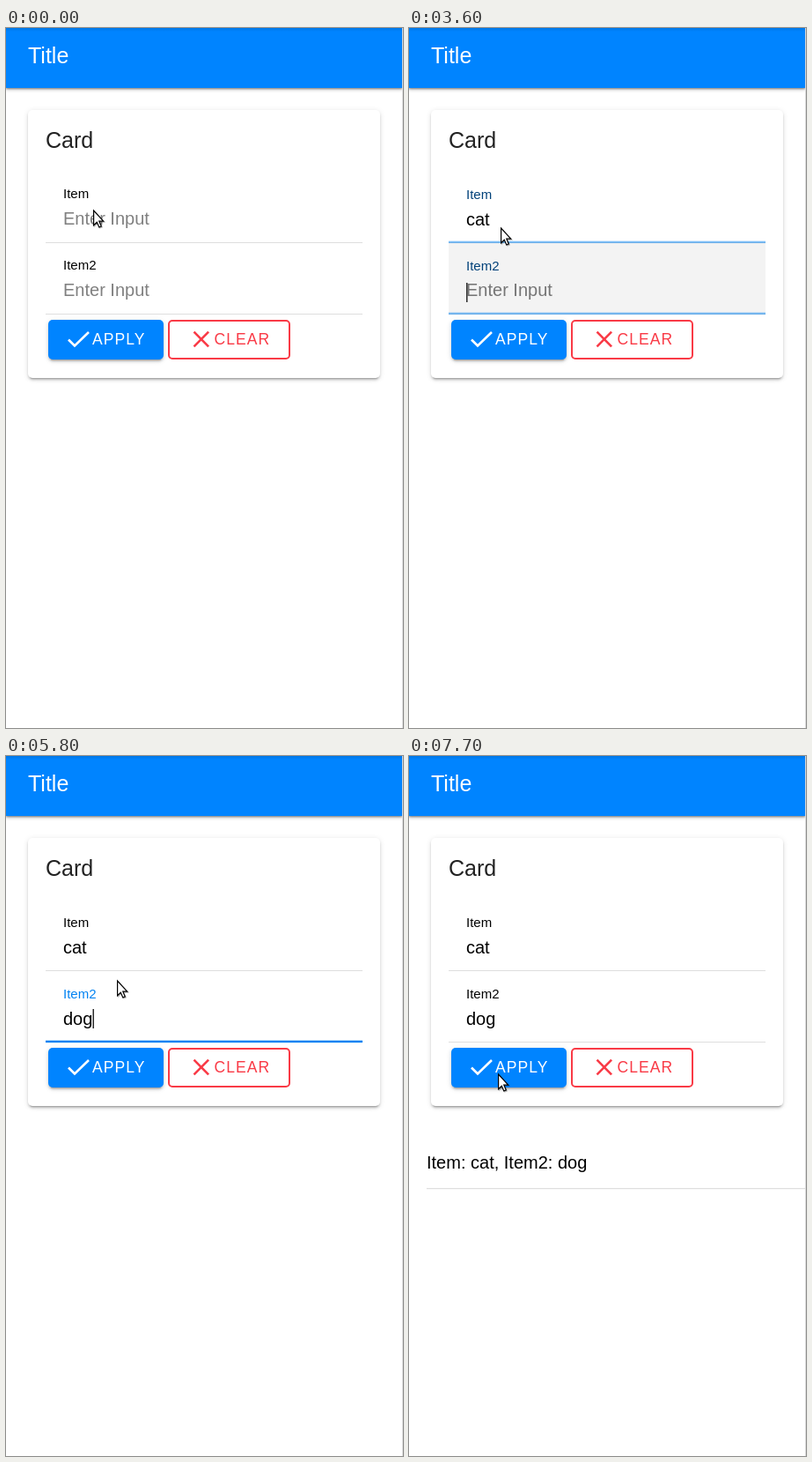
These frames come from a looping animation (451x794 px, 8 s). An HTML page:

```html
<!DOCTYPE html>
<html lang="en">
<head>
<meta charset="utf-8">
<title>Form demo</title>
<style>
html, body { margin: 0; width: 100%; height: 100%; overflow: hidden; background: #fff; }
div, svg { position: absolute; box-sizing: border-box; }
#header {
  left: 0; top: 0; width: 450px; height: 68px;
  background: linear-gradient(#0076e4, #0084ff 4px);
  box-shadow: 0 1px 2px rgba(0,0,0,.4), 0 2px 4px rgba(0,0,0,.22);
}
#edge { left: 450px; top: 0; width: 1px; height: 100%; background: #d8d8d8; }
#card { left: 25px; top: 93px; width: 400px; height: 303.5px; border-radius: 5px; background: #fff; }
#apply { left: 47.5px; top: 330.5px; width: 131.3px; height: 45px; border-radius: 5px; background: #0084ff; overflow: hidden; }
#lift { left: 47.5px; top: 330.5px; width: 131.3px; height: 45px; border-radius: 5px;
  box-shadow: 0 6px 6px -4px rgba(0,0,0,.2), 0 10px 12px 1px rgba(0,0,0,.14), 0 4px 17px 2px rgba(0,0,0,.12); }
#card, #apply { box-shadow: 0 3.75px 1.25px -2.5px rgba(0,0,0,.2), 0 2.5px 2.5px rgba(0,0,0,.14), 0 1.25px 6.25px rgba(0,0,0,.12); }
#ripple { border-radius: 50%; background: #fff; transform: translate(-50%, -50%); left: 53.5px; top: 29.5px; }
#clear { left: 184px; top: 330.5px; width: 138.6px; height: 45px; border-radius: 5px; border: 2.5px solid #f93a46; }
svg { left: 0; top: 0; }
text { font: 20px "Liberation Sans", Arial, sans-serif; white-space: pre; }
.big { font-size: 25px; }
.label { font-size: 15px; }
.button { font-size: 17.5px; letter-spacing: 1.05px; }
.icon { fill: none; stroke-width: 2.6; }
#cursor { filter: drop-shadow(1px 1px .6px rgba(0,0,0,.25)); }
</style>
</head>
<body>
<div id="header"></div>
<div id="card"></div>
<div id="lift"></div>
<div id="apply"><div id="ripple"></div></div>
<div id="clear"></div>
<div id="edge"></div>
<svg width="451" height="794">
  <text class="big" x="25" y="40" fill="#fff">Title</text>
  <text class="big" x="45" y="136" fill="#222">Card</text>
  <g id="items"></g>
  <path class="icon" d="M71 353.5l7 7L94 345" stroke="#fff"/>
  <text class="button" x="98" y="359" fill="#fff">APPLY</text>
  <path class="icon" d="M213.5 344.7l16.6 16.6m0-16.6l-16.6 16.6" stroke="#f93a46"/>
  <text class="button" x="236.6" y="359" fill="#f93a46">CLEAR</text>
  <g id="result">
    <text x="20" y="468">Item: cat, Item2: dog</text>
    <rect x="20" y="490" width="430" height="1.25" fill="#dedede"/>
  </g>
  <path id="cursor" d="M.6 1V17.8L4.3 14.2 6.8 20 9.3 18.9 6.8 13.2H11.7Z" fill="#fff" stroke="#000" stroke-width="1.2"/>
</svg>
<script>
const LOOP = 8000;
const $ = id => document.getElementById(id);

const items = [
  { name: 'Item', y: 0, value: 'cat', focus: 600, blur: 3600, keys: [1900, 2200, 2300] },
  { name: 'Item2', y: 81, value: 'dog', focus: 3600, blur: 7200, keys: [4300, 4400, 4500], tabbed: true }
];

// Time, x and y of the pointer tip.
const pointerPath = [
  [0, 99, 206], [300, 104, 226], [5400, 104, 226], [5500, 103, 226], [5600, 103, 226],
  [5800, 126, 254], [5900, 137, 284], [6000, 130, 317], [6100, 113, 344], [6200, 101, 360]
];

// Time, ripple diameter, ripple opacity and button lift.
const pressPath = [
  [7100, 0, 0, 0], [7200, 80, .16, .4], [7300, 153, .17, 1],
  [7400, 190, .16, .9], [7700, 190, 0, 0]
];

function sample(path, t) {
  const i = path.findIndex(p => p[0] > t);
  if (i === 0) return path[0].slice(1);
  if (i < 0) return path[path.length - 1].slice(1);
  const a = path[i - 1], b = path[i], k = (t - a[0]) / (b[0] - a[0]);
  return a.slice(1).map((v, n) => v + (b[n + 1] - v) * k);
}

function make(parent, tag, attrs) {
  const el = document.createElementNS('http://www.w3.org/2000/svg', tag);
  for (const key in attrs) el.setAttribute(key, attrs[key]);
  return parent.appendChild(el);
}

for (const item of items) {
  const g = make($('items'), 'g', { transform: `translate(0 ${item.y})` });
  item.shade = make(g, 'rect', { x: 45, y: 163, width: 360, height: 81, fill: '#e7e7e7' });
  make(g, 'rect', { x: 45, y: 243, width: 360, height: 1, fill: '#dedede' });
  item.line = make(g, 'rect', { x: 45, y: 241.7, width: 360, height: 2.4, fill: '#0082f2' });
  item.label = make(g, 'text', { class: 'label', x: 65 });
  item.label.textContent = item.name;
  item.text = make(g, 'text', { x: 65 });
  item.caret = make(g, 'rect', { width: 1.25, height: 22 });
}

function drawItem(item, t) {
  const focused = t >= item.focus && t < item.blur;
  const glow = sample([[item.focus - 100, 0], [item.focus + 100, 1],
    [item.blur - 100, 1], [item.blur + 100, 0]], t)[0];
  const typed = item.value.slice(0, item.keys.filter(k => t >= k).length);

  item.label.setAttribute('y', t >= item.focus ? 194 : 193);
  item.label.setAttribute('fill', `rgb(0,${130 * glow},${242 * glow})`);
  item.line.setAttribute('opacity', glow);

  const since = t - item.focus;
  item.shade.setAttribute('opacity', item.tabbed && since >= 0 && since < 200 ? (since < 100 ? .5 : 1) : 0);

  item.text.textContent = typed || 'Enter Input';
  item.text.setAttribute('y', typed ? 224 : 223);
  item.text.setAttribute('fill', typed ? '#000' : since >= 0 && since < 200 && item.tabbed ? '#757575' : '#808080');

  const lastInput = [item.focus, ...item.keys].filter(k => t >= k).pop();
  const lit = focused && Math.floor((t - lastInput) / 500) % 2 === 0;
  item.caret.setAttribute('opacity', lit ? 1 : 0);
  item.caret.setAttribute('x', 65.2 + (typed ? item.text.getComputedTextLength() : 0));
  item.caret.setAttribute('y', typed ? 206 : 208);
}

function draw(now) {
  // The screen refreshes ten times a second.
  const t = Math.floor(now % LOOP / 100) * 100;
  items.forEach(item => drawItem(item, t));

  const [x, y] = sample(pointerPath, t).map(Math.round);
  $('cursor').setAttribute('transform', `translate(${x} ${y})`);

  const [size, opacity, lift] = sample(pressPath, t);
  $('ripple').style.width = $('ripple').style.height = size + 'px';
  $('ripple').style.opacity = opacity;
  $('lift').style.opacity = lift;
  $('result').setAttribute('opacity', t >= 7300 ? 1 : 0);
}

const start = performance.now();
function tick() {
  draw(performance.now() - start);
  requestAnimationFrame(tick);
}
tick();
</script>
</body>
</html>
```
